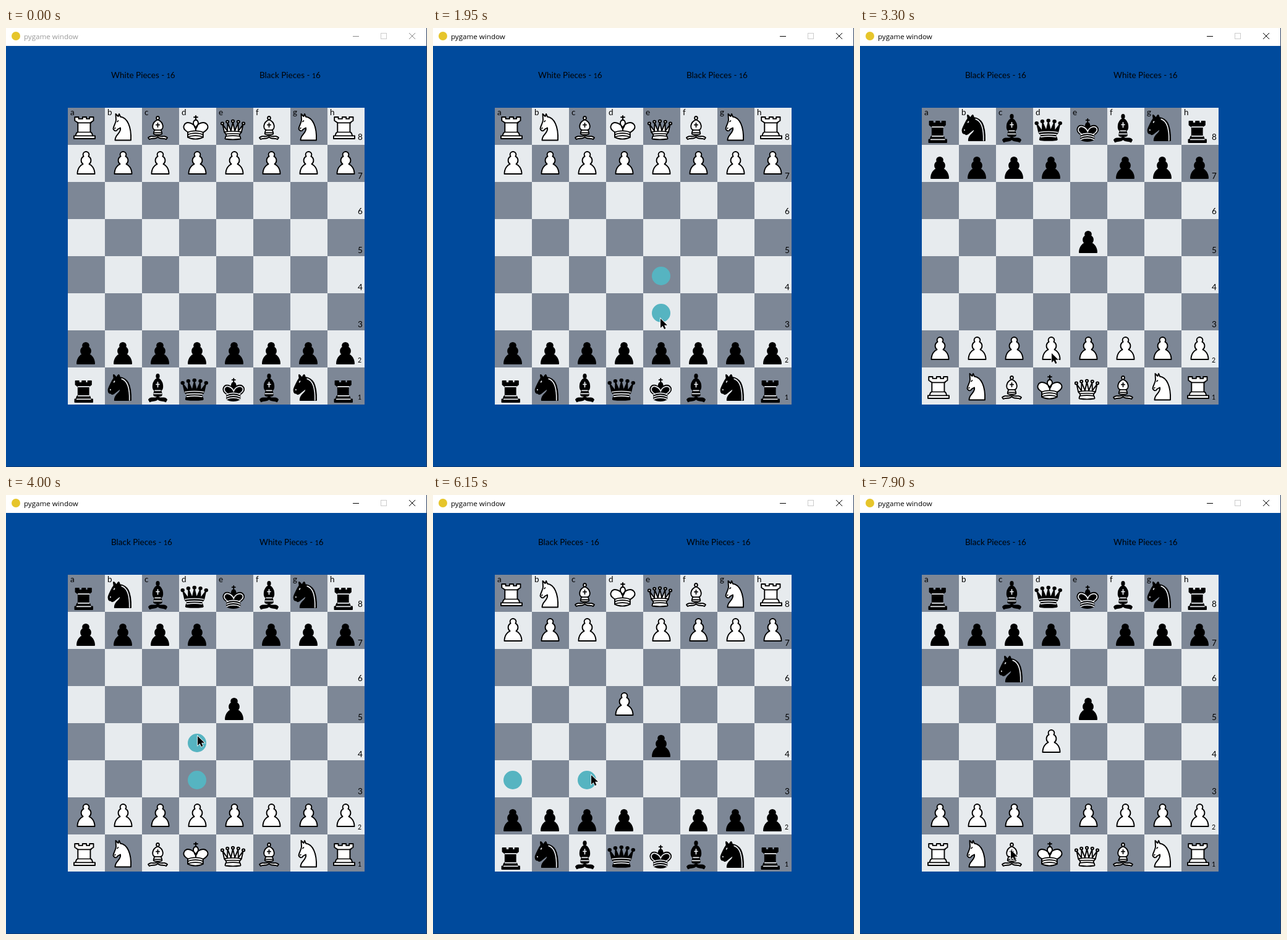
Animation, 681 px wide and 710 px high, one loop 8000 ms. Source, as an HTML page with a canvas:

```html
<!DOCTYPE html>
<html lang="en">
<head>
<meta charset="utf-8">
<title>pygame window</title>
<style>
  html, body { margin: 0; width: 100%; height: 100%; overflow: hidden; background: #004a9c; }
  canvas { display: block; }
</style>
</head>
<body>
<canvas id="stage" width="681" height="710"></canvas>
<script>
const ctx = document.getElementById('stage').getContext('2d');
const LOOP = 8000, TICK = 50;
const LEFT = 100, TOP = 129, CELL = 60;
const FILES = 'abcdefgh';
const ACTIVATED = 1750;

// Outline (filled and stroked), inner lines, and the box they occupy.
const SHAPES = {
  P: {
    box: [10.5, 9, 33.5, 39.5],
    body: `M22 9c-2.2 0-4 1.8-4 4 0 .9.3 1.7.8 2.4-2 1.1-3.3 3.2-3.3 5.6 0 2 .9 3.8 2.4 5
      -3 1.1-7.4 5.6-7.4 13.5h23c0-7.9-4.4-12.4-7.4-13.5 1.5-1.2 2.4-3 2.4-5
      0-2.4-1.3-4.5-3.3-5.6.5-.7.8-1.5.8-2.4 0-2.2-1.8-4-4-4z`,
    lines: ''
  },
  R: {
    box: [9, 9, 36, 39],
    body: `M9 39h27v-4h-3l-1-3.5-2-2V17l4-3V9h-5v2.5h-4V9h-5v2.5h-5V9h-5v5l4 3v12.5l-2 2-1 3.5H9z`,
    lines: 'M12 35h21M14 30h17M14 17h17'
  },
  N: {
    box: [6, 7, 38, 39],
    body: `M15 39c0-9 9-7 8.5-16-2 3-5.5 4.5-7.5 6-3 2-2.8 2.6-5 2.3-1-.9 1.4-3 0-3-1 0 .2 1.2-1 2
      -1 0-4 .7-4-4.3 0-2 6-12 6-12s1.9-1.9 2-3.5c-.7-1-.5-2.5-.5-3.5 1 0 3 2.8 3 2.8h2S19 8 20.5 7
      c1 0 1.5 3 1.5 3 10.5 1 16.5 8 16 29z`,
    lines: 'M25 12c7 2 11.5 10 11 27M9 25.5v.6M14 16.2l.8-1.2'
  },
  N2: {
    box: [13, 9, 43, 53],
    body: `M16.5 52.5C16 43 27 41 25 32.5c-2 1.5-5 1.5-6 4.5-2 1-5-.5-5.5-3
      .5-5 4-8.500 4.500-14l-.5-10 4 4 1.500-4 2 4.500C36 16 43 30 42 52.500z`,
    lines: 'M20 22.500l1.500-1.500M16 33.500l.8-.8'
  },
  B: {
    box: [6, 5.5, 39, 39],
    body: `M22.5 33c-2 4-9 2-12 2.500-2 .3-3.500 1-4.500 2l2 2.500c4-2.500 12 .5 14.500-4
      2.500 4.500 10.500 1.500 14.500 4l2-2.500c-1-1-2.500-1.700-4.500-2-3-.5-10 1.500-12-2.500z
      M15.500 32c2.500 1.500 11.500 1.500 14 0 .5-1.500 0-2 0-2 0-2.500-2-4-2-4 5.500-1.500 6-11.500-5-15.500
      -11 4-10.500 14-5 15.500 0 0-2 1.500-2 4 0 0-.5.5 0 2zM25 8a2.500 2.500 0 1 1-5 0 2.500 2.500 0 1 1 5 0z`,
    lines: 'M17.500 26h10M15.500 30h14M22.500 15.500v6M19.700 18.200h5.600'
  },
  K: {
    box: [5.5, 6, 39.5, 40],
    body: `M22.5 12V6M20 8h5M22.5 25s4.500-7.500 3-10.500c0 0-1-2.500-3-2.500s-3 2.500-3 2.500c-1.500 3 3 10.500 3 10.500
      M11.500 37c5.500 3.500 15.500 3.500 21 0v-7s9-4.500 6-10.500c-4-6.500-13.500-3.500-16 4V27v-3.500
      c-3.500-7.500-13-10.500-16-4-3 6 5 10 5 10z`,
    lines: 'M11.500 30c5.500-3 15.500-3 21 0M11.500 33.500c5.500-3 15.500-3 21 0M11.500 37c5.500-3 15.500-3 21 0',
    trim: 'M31.500 29s8-3.800 5.500-8.800c-3.500-5-12-1.700-14.500 5C20 18.500 11 15 8 20.200c-2.500 5 5 8.800 5 8.800'
  },
  Q: {
    box: [3.2, 5.2, 41.8, 39],
    body: [[6, 12], [14, 9], [22.5, 8], [31, 9], [39, 12]]
      .map(([x, y]) => `M${x - 2} ${y}a2 2 0 1 1 4 0 2 2 0 1 1-4 0z`).join('') +
      `M9 26l-2.500-12.500L14 25l.3-14 5.200 13.500 3-14.500 3 14.500 5.200-13.500.3 14 7.500-11.500L36 26
      c0 2-1.500 2-2.500 4-1 1.500-1 1-.5 3.500 1.500 1 1 2.500 1 2.500 1.500 1.500 0 2.500 0 2.500-6.500 1-16.500 1-23 0
      0 0-1.500-1 0-2.500 0 0-.5-1.500 1-2.500.5-2.500.5-2-.5-3.500-1-2-2.500-2-2.500-4z`,
    lines: 'M9.500 26.500c8-1.500 18-1.500 26 0M11.500 30c4-1 18-1 22 0M12 33.700c6-1 15-1 21 0'
  }
};

// Where each piece sits inside its cell.
const PLACES = {
  wP: [15.5, 11, 43.5, 47], bP: [15, 20, 43, 54],
  wR: [10, 15, 44, 50],     bR: [11.5, 22, 40, 56],
  wN: [13, 9, 43, 53],      bN: [5.5, 12, 42, 53],
  wB: [10, 14, 41, 50],     bB: [11, 11, 40, 54],
  wK: [7, 13, 47, 51],      bK: [11, 18, 45.5, 54.5],
  wQ: [7, 19, 47, 51],      bQ: [2.5, 18, 47, 52.5]
};

function fit(d, from, to) {
  const sx = (to[2] - to[0]) / (from[2] - from[0]);
  const sy = (to[3] - to[1]) / (from[3] - from[1]);
  const path = new Path2D();
  path.addPath(new Path2D(d), new DOMMatrix([sx, 0, 0, sy, to[0] - from[0] * sx, to[1] - from[1] * sy]));
  return path;
}

const PIECES = {};
for (const [id, place] of Object.entries(PLACES)) {
  const shape = SHAPES[id === 'wN' ? 'N2' : id[1]];
  const black = id[0] === 'b';
  PIECES[id] = {
    black,
    body: fit(shape.body, shape.box, place),
    lines: fit(shape.lines + (black && shape.trim || ''), shape.box, place)
  };
}

// Rows are counted with White at the top.
const SETUP = [];
[...'RNBKQBNR'].forEach((kind, col) => {
  SETUP.push({ id: 'w' + kind, col, row: 0 }, { id: 'wP', col, row: 1 }, { id: 'bP', col, row: 6 });
});
[...'RNBQKBNR'].forEach((kind, col) => SETUP.push({ id: 'b' + kind, col, row: 7 }));

// Each move: when its hints show, when it is played, and the squares as [col, row].
const MOVES = [
  { hint: 1750, play: 2350, from: [4, 6], to: [4, 4], dots: [[4, 5], [4, 4]] },
  { hint: 3350, play: 4200, from: [3, 1], to: [3, 3], dots: [[3, 2], [3, 3]] },
  { hint: 5650, play: 6400, from: [1, 7], to: [2, 5], dots: [[0, 5], [2, 5]] }
];

// Pointer stops: time, x, y.
const STOPS = [
  [250, 15, -20], [300, 15, 0], [1100, 366, 510], [1150, 366, 510], [1200, 396, 543],
  [1450, 369, 520], [1750, 369, 520], [2200, 367, 401], [2800, 367, 401],
  [3300, 310, 526], [3400, 310, 526], [3650, 305, 476], [4000, 310, 390],
  [4700, 310, 390], [5250, 215, 513], [5550, 182, 585], [5650, 182, 585],
  [5850, 263, 442], [6050, 263, 442], [6150, 256, 453], [7200, 256, 453], [7900, 244, 574]
];
const ARROW = new Path2D('M0 0V15l3.500-3.300 2.500 5.300 2.500-1.100-2.400-5.100H11z');

function pointerAt(t) {
  const next = STOPS.findIndex(stop => stop[0] > t);
  if (next === 0) return null;
  if (next < 0) return STOPS[STOPS.length - 1].slice(1);
  const [t0, x0, y0] = STOPS[next - 1], [t1, x1, y1] = STOPS[next];
  const u = (t - t0) / (t1 - t0), k = u * u * (3 - 2 * u);
  return [Math.round(x0 + (x1 - x0) * k), Math.round(y0 + (y1 - y0) * k)];
}

function rect(color, x, y, w, h) {
  ctx.fillStyle = color;
  ctx.fillRect(x, y, w, h);
}

function disc(color, x, y, r) {
  ctx.fillStyle = color;
  ctx.beginPath();
  ctx.arc(x, y, r, 0, Math.PI * 2);
  ctx.fill();
}

// Text with old-style figures: 0-2 are low, 3-5, 7 and 9 hang below the line.
function label(text, x, y) {
  ctx.fillStyle = '#000';
  for (const part of text.match(/\d|\D+/g)) {
    ctx.font = `${/[012]/.test(part) ? 10.5 : 13.5}px Lato, sans-serif`;
    ctx.fillText(part, x, y + (/[34579]/.test(part) ? 3 : 0));
    x += ctx.measureText(part).width;
  }
}

function drawWindow(active) {
  rect('#004a9c', 0, 0, 681, 710);
  rect('#fff', 0, 0, 681, 29);
  disc('#e6c52b', 16, 13, 7);
  ctx.fillStyle = active ? '#000' : '#999';
  ctx.font = '11.6px "Open Sans", sans-serif';
  ctx.fillText('pygame window', 29, 18);

  const ink = active ? '#000' : '#888';
  rect(ink, 561, 13, 10, 1);
  ctx.lineWidth = 1;
  ctx.strokeStyle = '#ccc';
  ctx.strokeRect(606.5, 8.5, 9, 9);
  ctx.strokeStyle = ink;
  ctx.stroke(new Path2D('M652 8l10 10M662 8l-10 10'));
  rect('#2a3f5f', 680, 0, 1, 710);
  rect('#0b3a75', 0, 709, 681, 1);
}

function drawPiece({ black, body, lines }, x, y) {
  ctx.save();
  ctx.translate(x, y);
  ctx.lineJoin = ctx.lineCap = 'round';
  ctx.lineWidth = 1.9;
  ctx.fillStyle = black ? '#000' : '#fff';
  ctx.strokeStyle = '#000';
  ctx.fill(body);
  ctx.stroke(body);
  ctx.lineWidth = 1.7;
  ctx.strokeStyle = black ? '#e8ebef' : '#000';
  ctx.stroke(lines);
  ctx.restore();
}

function drawBoard(t) {
  const played = MOVES.filter(move => t >= move.play);
  const flipped = played.length % 2 === 1;
  const cellX = col => LEFT + col * CELL;
  const cellY = row => TOP + (flipped ? 7 - row : row) * CELL;

  for (let i = 0; i < 64; i++) {
    const col = i % 8, row = i >> 3;
    rect((col + row) % 2 ? '#e7ebee' : '#7d8796', LEFT + col * CELL, TOP + row * CELL, CELL, CELL);
  }

  for (const piece of SETUP) {
    const move = played.find(({ from }) => from[0] === piece.col && from[1] === piece.row);
    const [col, row] = move ? move.to : [piece.col, piece.row];
    drawPiece(PIECES[piece.id], cellX(col), cellY(row));
  }

  const pending = MOVES.find(move => t >= move.hint && t < move.play);
  if (pending) {
    for (const [col, row] of pending.dots) disc('#56b4c1', cellX(col) + 29, cellY(row) + 32, 15);
  }

  for (let i = 0; i < 8; i++) {
    label(FILES[i], LEFT + i * CELL + 4, 141);
    label(String(8 - i), 569, 181 + i * CELL);
  }
  const sides = played.length ? ['Black', 'White'] : ['White', 'Black'];
  sides.forEach((side, i) => label(`${side} Pieces - 16`, 170 + i * 240, 81));
}

function drawPointer(t) {
  const tip = pointerAt(t);
  if (!tip) return;
  ctx.save();
  ctx.translate(...tip);
  ctx.lineWidth = 1.6;
  ctx.strokeStyle = '#fff';
  ctx.stroke(ARROW);
  ctx.fillStyle = '#000';
  ctx.fill(ARROW);
  ctx.restore();
}

function frame() {
  const t = Math.floor(performance.now() % LOOP / TICK) * TICK;
  drawWindow(t >= ACTIVATED);
  drawBoard(t);
  drawPointer(t);
  requestAnimationFrame(frame);
}
frame();
</script>
</body>
</html>
```
